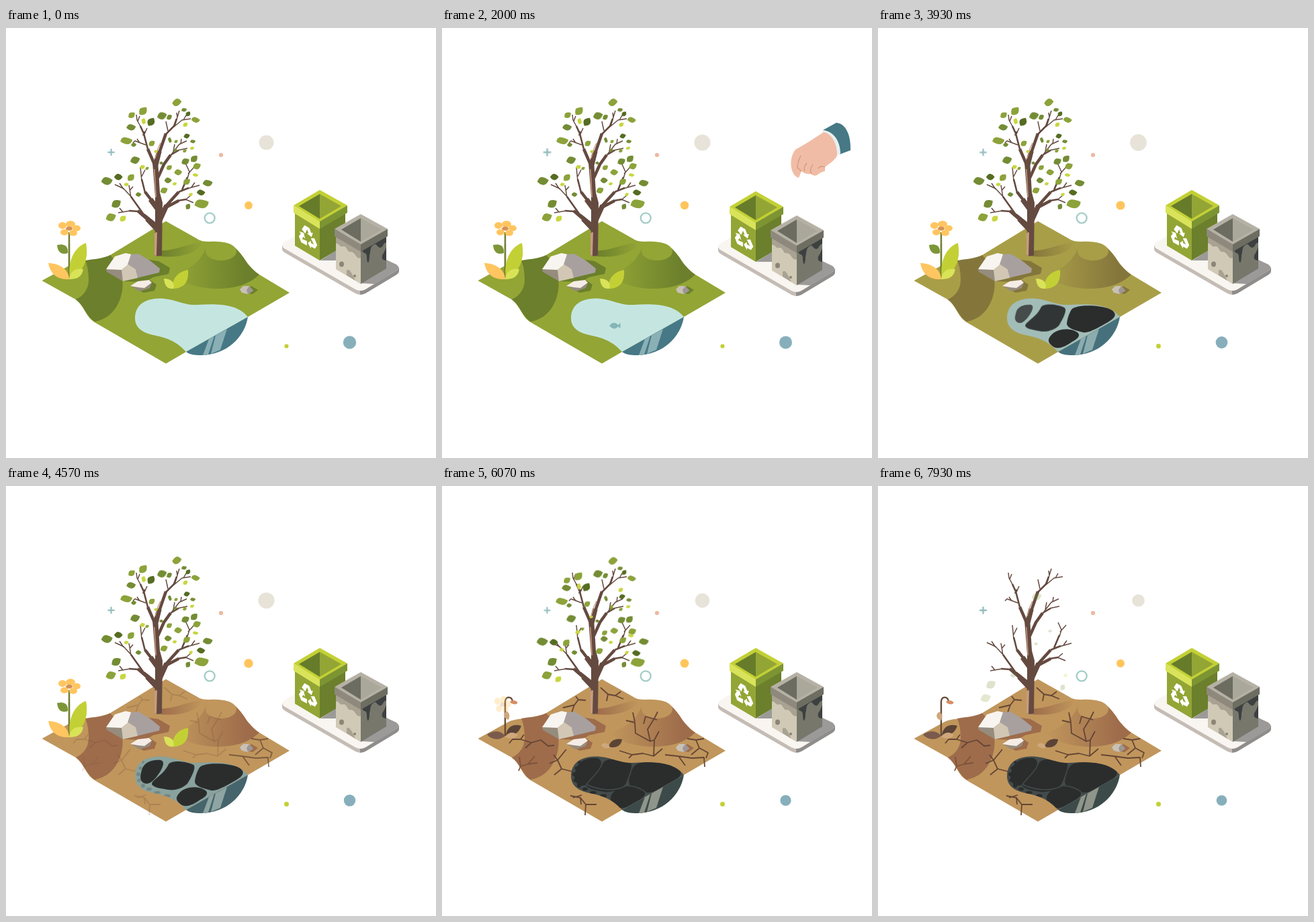
These frames come from a looping animation (640x640 px, 8000 ms). An HTML page without scripts:

```html
<!DOCTYPE html>
<html lang="en">
<head>
<meta charset="utf-8">
<title>Polluted meadow</title>
<style>
html,body{margin:0;width:100%;height:100%;overflow:hidden;background:#fff}
svg{display:block;width:100vw;height:100vh}
svg *{animation:0s linear infinite}
svg [class]{animation-duration:8s}

/* ground */
.land{fill:#93a535;stop-color:#93a535;animation-name:land}
.dark{fill:#6b7f2c;stop-color:#6b7f2c;animation-name:dark}
@keyframes land{0%,43.5%{fill:#93a535;stop-color:#93a535}55%,100%{fill:#c0965c;stop-color:#c0965c}}
@keyframes dark{0%,43.5%{fill:#6b7f2c;stop-color:#6b7f2c}55%,100%{fill:#9e6c4b;stop-color:#9e6c4b}}
.crack{fill:none;stroke:#654536;stroke-width:1.8;stroke-linejoin:bevel}
.c1{animation-name:c1}
.c2{animation-name:c2}
@keyframes c1{0%,52%{opacity:0}59%,100%{opacity:1}}
@keyframes c2{0%,55%{opacity:0}57%{opacity:.2}66%,100%{opacity:1}}

/* pond */
.water{fill:#c5e6e0;animation-name:water}
.side{fill:#467885;animation-name:side}
.glint{fill:#8ab0b5;animation-name:glint}
@keyframes water{0%,29%{fill:#c5e6e0}38%{fill:#c3e1db}57%{fill:#8aa39e}72%,100%{fill:#434b4a}}
@keyframes side{0%,45%{fill:#467885}57%{fill:#46646b}74%,100%{fill:#3c4b49}}
@keyframes glint{0%,45%{fill:#8ab0b5}57%{fill:#8fa5a3}74%,100%{fill:#8f958a}}
.oil{fill:#2b2d2d;stroke:#2b2d2d;transform-box:fill-box;transform-origin:50% 50%}
.o1{animation-name:o1}
.o2{animation-name:o2}
.o3{animation-name:o3}
.o4{animation-name:o4}
@keyframes o1{0%,27%{transform:scale(0);opacity:0;stroke-width:0}38.4%{transform:scale(.79);opacity:.9}46%,57%{transform:none;opacity:1;stroke-width:0}74%,100%{stroke-width:6}}
@keyframes o2{0%,32%{transform:scale(0);opacity:0;stroke-width:0}38.4%{transform:scale(.56);opacity:.6}47%,57%{transform:none;opacity:1;stroke-width:0}74%,100%{stroke-width:6}}
@keyframes o3{0%,35.5%{transform:translate(5px,6px) scale(0);opacity:0;stroke-width:0}38.4%{transform:translate(5px,6px) scale(.26);opacity:.25}50%,57%{transform:none;opacity:1;stroke-width:0}74%,100%{stroke-width:6}}
@keyframes o4{0%,39%{transform:scale(0);opacity:0;stroke-width:0}52%,57%{transform:none;opacity:1;stroke-width:0}74%,100%{stroke-width:6}}
.fish{fill:#86b5b8;animation-name:fish}
@keyframes fish{0%,6%{transform:translate(35px,6px);opacity:0}12%{opacity:1}25%{transform:none;opacity:1}31%{opacity:1}36%,100%{transform:translate(-16px,-6px);opacity:0}}

/* plants */
.fresh{animation-name:fresh}
.dry{animation-name:dry}
.head{animation-name:head;transform-box:fill-box;transform-origin:50% 50%}
.bud{animation-name:bud}
@keyframes fresh{0%,65%{opacity:1;transform:none}74%,100%{opacity:0;transform:translateY(8px)}}
@keyframes dry{0%,66%{opacity:0}74%,100%{opacity:1}}
@keyframes head{0%,66%{opacity:1;transform:none}76%{opacity:.3;transform:translate(-4px,27px) scale(.75,1.1)}82%,100%{opacity:0;transform:translate(-5px,36px) scale(.7,1.1)}}
@keyframes bud{0%,66%{opacity:0;transform:translate(5px,-6px)}76%{opacity:1;transform:translate(5px,-1px)}86%,100%{opacity:1;transform:none}}

/* tree leaves */
.a{fill:#8ca23a}.b{fill:#748c34}.c{fill:#556c22}.d{fill:#c8d640}
.early{animation-name:early}
.left{animation-name:left}
.right{animation-name:right}
.late{animation-name:late}
@keyframes early{0%,70%{transform:none;opacity:1}76%{transform:translate(-1px,11px);opacity:1}81%{transform:translate(2px,21px);opacity:.9}86.6%{transform:translate(4px,33px);opacity:.3}90%,100%{transform:translate(5px,38px);opacity:0}}
@keyframes left{0%,73%{transform:none;opacity:1}76%{transform:translate(-1px,4px)}86.6%{transform:translate(-3px,23px);opacity:1}95%,100%{transform:translate(-4px,40px);opacity:0}}
@keyframes right{0%,75.5%{transform:none;opacity:1}86.6%{transform:translate(5px,20px);opacity:1}96%,100%{transform:translate(7px,38px);opacity:0}}
@keyframes late{0%,77%{transform:none;opacity:1}86.6%{transform:translate(3px,11px);opacity:1}92%{opacity:.9}99.1%,100%{transform:translate(4px,34px);opacity:.25}}

/* hand and bins */
.hand{animation-name:hand}
.bins{animation-name:bins}
@keyframes hand{0%,1%{transform:translate(20px,-9px);opacity:0}10%,26%{transform:none;opacity:1}32%,100%{transform:translate(20px,-9px);opacity:0}}
@keyframes bins{0%,22.5%{transform:none}25%{transform:translateY(2px)}29%,100%{transform:none}}

/* floating dots */
.p1{animation-name:p1}
.p2{animation-name:p2}
.p3{animation-name:p3}
.p4{animation-name:p4}
.plus{animation-name:plus;transform-origin:156.5px 185px}
@keyframes p1{0%{r:11px}25%{r:12px}40%{r:12.7px}57%{r:12.1px}76%{r:10.7px}100%{r:9.3px}}
@keyframes p2{0%{r:9.7px}25%{r:9.5px}57%{r:8.7px}76%{r:8.1px}100%{r:7.8px}}
@keyframes p3{0%{r:5.9px}57%{r:6.7px}100%{r:6px}}
@keyframes p4{0%,25%{r:3.1px}57%,100%{r:3.5px}}
@keyframes plus{0%{transform:scale(.93)}25%{transform:scale(1.05)}57%{transform:scale(.93)}76%{transform:scale(.88)}100%{transform:none}}
</style>
</head>
<body>
<svg viewBox="0 0 640 640">
<defs>
  <path id="l" d="M-6 4Q-6.500-3-3-5Q1-6.500 6-5Q6.500 1 3.500 4Q0 6.500-6 4Z"/>
  <path id="arrow" d="M-9.5-7L-5-15H2.5L5.8-9.5L8.5-11L6.3-3.9L-1.2-5.3L1.5-7L-1-11L-4-3.6Z"/>
  <path id="pond" d="M192 432C192 412 207 403 228 402.500C252 402.500 262 413 285 412C312 410 345 410 360 430L268 482C250 462 232 460 215 456C200 452 192 444 192 432Z"/>
  <clipPath id="pool"><use href="#pond"/></clipPath>
  <linearGradient id="hill"><stop class="land"/><stop class="dark" offset=".85"/></linearGradient>
  <linearGradient id="shade"><stop class="dark"/><stop class="land" offset="1"/></linearGradient>
</defs>

<!-- ground -->
<path class="land" d="M53.500 376L99 351C114 344 140 347 155 338L238 287.500L285 314C294 320 305 317 315 318C337 318 348 333 357 347C362 354 369 362 377 367L422 394L360 430L268 482L238 499.500L131 437.500C117 428 116 410 100 402Z"/>
<path class="dark" d="M118 346C130 344 145 343 155 338C173 356 178 380 170 403C163 422 150 434 132 437C120 430 116 413 104 404C117 398 123 387 123 375C123 362 121 353 118 346Z"/>
<path fill="url(#shade)" d="M230 331C248 333 268 321 293 319C288 330 270 343 230 340Z"/>
<path fill="url(#hill)" d="M297 329C287 352 268 360 251 369C277 390 321 392 350 383C365 378 374 370 377 367C369 362 362 354 357 347C352 339 347 333 342 328Z"/>
<ellipse class="land" cx="320" cy="332.500" rx="23" ry="13.500"/>
<g class="dark">
  <path d="M200 343L227 347L244 357L242 366L219 371L207 378L174 377Z"/>
  <path d="M193 388L214 375L224 382L221 391L205 394Z"/>
  <path d="M355 394L365 384L375 390L367 396Z"/>
</g>

<g class="crack c1">
  <path d="M332 400L350 402L372 405L390 404L391 418M352 402L362 416M365 376L378 378L383 390L396 397L393 405M383 390L371 400M378 378L390 376"/>
</g>
<g class="crack c2">
  <path d="M274 349L287 352L288 368L310 380L316 378L315 402M310 380L306 362L316 346L321 336M287 351L284 337M300 354L303 343L320 348M316 378L323 365M264 394L283 400L299 398L315 402L328 391M283 400L278 405"/>
  <path d="M236 300L247 310L245 320M247 310L258 312L266 306M258 312L270 317M180 330L197 326L203 318L214 319M197 326L193 337M203 318L199 313"/>
  <path d="M100 383L105 377L117 377L133 382L147 378L158 387L167 386M117 377L122 370M133 382L124 390M185 392L172 408L178 421L194 425M172 408L160 413M178 421L167 430M172 408L166 400"/>
  <path d="M191 461L206 464L214 474L230 474M206 464L207 474M214 474L213 490M195 464L208 460"/>
  <path d="M115 403L117 417L128 414L138 402M128 414L142 412M117 417L114 424" stroke="#7d533b"/>
</g>

<!-- pond -->
<use href="#pond" class="water"/>
<g clip-path="url(#pool)">
  <g class="c2" fill="#2b2d2d"><circle cx="200" cy="420" r="2.500"/><circle cx="197" cy="429" r="3"/><circle cx="198" cy="438" r="2.500"/><circle cx="204" cy="446" r="3"/><ellipse cx="213" cy="451" rx="4" ry="2.500"/><ellipse cx="225" cy="456" rx="5" ry="2"/><ellipse cx="240" cy="461" rx="5" ry="2.500"/><circle cx="204" cy="411" r="2"/></g>
  <path class="oil o4" d="M202 423C205 410 220 407 230 408C239 410 231 424 224 433C217 441 212 445 205 442C198 438 200 431 202 423Z"/>
  <path class="oil o3" d="M242 414C247 407 270 410 279 415C284 419 275 435 270 443C264 449 252 454 241 452C230 450 220 449 217 444C217 437 235 430 242 414Z"/>
  <path class="oil o1" d="M288 419C296 411 330 412 347 419C357 426 353 431 342 438C331 444 314 455 305 453C292 450 281 446 281 440C282 431 285 424 288 419Z"/>
  <path class="oil o2" d="M258 457C265 448 284 446 293 451C303 455 300 461 289 467C280 473 270 479 262 475C252 469 252 463 258 457Z"/>
  <path class="dry" fill="none" stroke="#434b4a" stroke-width="1.500" d="M239 406C240 421 224 432 215 444C230 452 257 456 274 446C277 433 284 424 283 412M274 446C287 446 297 450 304 457"/>
</g>
<path class="fish" d="M249 443Q256 435 262 442L265.500 439V447L262 444.500Q256 451 249 443Z"/>
<path class="side" d="M360 430C355.500 460 328 487 290 487C280 487 273 486 268 482Z"/>
<path class="glint" d="M302 463L310 458.500L301 486L293 487ZM312 457.500L329 448L319 479L305 485Z"/>

<!-- rocks -->
<path fill="#958c7e" d="M149 360L163 352L174 362V377L150 363Z"/>
<path fill="#f8f4f0" d="M149 359L162 340L178 335L187 337L182 352L172 360Z"/>
<path fill="#a8a09f" d="M186 337L197 336L214 346L229 358L228 364L195 372L193 359L181 352Z"/>
<path fill="#d2c7b4" d="M172 360L182 352L193 359L196 372L174 377Z"/>
<path fill="#958c7e" d="M185 384L196 386L206 384L217 379L214 387L199 392Z"/>
<path fill="#f6ece6" d="M185 384L196 377L213 375L217 379L206 387L197 386Z"/>
<path fill="#c9c0b6" d="M348 389L353 384L362 384L368 391L360 396L351 394Z"/>
<path fill="#9d9693" d="M362 384L368 391L360 396L358 390Z"/>

<!-- sprout -->
<g class="fresh"><path fill="#c3d035" d="M249 388C245 374 257 362 271 360C272 375 268 387 249 388Z"/><path fill="#d9e358" d="M235 373C247 373 252 380 249 388C238 389 236 381 235 373Z"/></g>
<g class="dry"><path fill="#5b4336" d="M248 388C251 378 259 375 268 377C267 387 258 391 248 388Z"/><path fill="#cfa77c" d="M237 386C241 380 247 382 250 389C246 392 240 390 237 386Z"/></g>

<!-- flower -->
<path d="M94 322V372" stroke="#64572f" stroke-width="2.200"/>
<path class="dry" d="M94 372V322C94 313 103 312 105 320" fill="none" stroke="#654a35" stroke-width="2.200"/>
<g class="fresh">
  <path d="M94 304V372" stroke="#6f7f31" stroke-width="2.500"/>
  <path fill="#7d9638" d="M76 323C88 320 93 326 92 335C83 338 77 334 76 323Z"/>
  <path fill="#c3d035" d="M95 373C91 344 104 325 119 320C123 341 118 363 95 373Z"/>
  <path fill="#ffc560" d="M63 350C80 350 94 360 94 374C77 375 66 367 63 350Z"/>
  <path fill="#d9e358" d="M94 374C95 361 105 357 115 359C113 371 105 374 94 374Z"/>
</g>
<g class="head" fill="#ffc560"><ellipse cx="84" cy="294" rx="6" ry="5"/><ellipse cx="96" cy="292" rx="7" ry="5"/><ellipse cx="105" cy="298" rx="6" ry="4.500"/><ellipse cx="100" cy="305" rx="6" ry="4.500"/><ellipse cx="87" cy="304" rx="6" ry="4.500"/><ellipse cx="94" cy="298.500" rx="5" ry="3" fill="#d39159"/></g>
<g class="dry">
  <path fill="#7a5a4c" d="M67 370C77 363 88 364 94 372C86 379 74 378 67 370Z"/>
  <path fill="#5b4336" d="M95 372C96 358 107 353 118 357C115 367 107 372 95 372Z"/>
  <path fill="#cfa77c" d="M94 373C100 365 108 366 113 371C107 377 100 377 94 373Z"/>
  <ellipse cx="107" cy="322" rx="5.500" ry="2.700" fill="#d98c62" transform="rotate(8 107 322)"/>
</g>
<path class="bud" fill="#cfa77c" d="M91 336Q98 340 94 349Q85 346 88 339Z"/>

<!-- tree -->
<path fill="#654a40" d="M221 338L222 292L222 250L218 200L226 196L229 245L233 260L232 338Q227 341 221 338Z"/>
<path fill="#c79c80" d="M221 338V306L225 302L224 339ZM220 210L222.500 252H224L221.500 210Z"/>
<g fill="none" stroke="#654a40" stroke-linejoin="round">
  <path stroke-width="7.500" d="M227 302L210 284M223 203L228 183M229 286L239 264M226 270L215 255"/>
  <path stroke-width="4.500" d="M221 203L211 180M228 186L238 157M226 223L235 203L245 189M238 265L257 244M212 286L196 272M217 257L207 244M240 266L257 257M225 294L205 278"/>
  <path stroke-width="2.600" d="M211 180L205 157L200 146M238 158L250 146L254 135M245 189L257 182M257 244L272 238M262 241L270 222M197 273L183 272M206 279L186 251M207 245L202 225M204 160L207 154M256 257L268 255"/>
  <path stroke-width="1.500" d="M201 148L195 137L194 129M196 139L199 131M205 160L210 149M208 174L192 168L189 171M199 171L195 165M251 146L258 123M255 133L254 126M250 147L262 137L275 135M264 137L268 130M241 153L238 139M256 182L270 179M247 187L258 173L269 168M249 184L251 173M260 173L261 165M270 239L288 234M276 237L281 230M270 224L273 214L268 203M271 217L280 207M267 255L279 260M268 255L275 249M185 272L167 275M174 274L169 268M188 253L175 239L162 233M175 240L169 231M186 252L183 234M184 242L189 236M202 228L200 207M202 221L207 211"/>
</g>
<path d="M222 194L226 180L230 171" fill="none" stroke="#c79c80" stroke-width="1.300"/>

<g class="late">
  <use href="#l" class="b" transform="translate(232 131)rotate(20)"/>
  <use href="#l" class="b" transform="translate(164 262)rotate(5)scale(1.050)"/>
  <use href="#l" class="a" transform="translate(156 282)rotate(15)scale(1.080)"/>
  <use href="#l" class="b" transform="translate(271 266)rotate(-15)scale(.6,.7)"/>
  <use href="#l" class="b" transform="translate(197 248)rotate(30)scale(.6)"/>
  <use href="#l" class="d" transform="translate(275 248)scale(.45)"/>
  <use href="#l" class="b" transform="translate(252 182)rotate(30)scale(.4)"/>
  <use href="#l" class="b" transform="translate(231 201)rotate(40)scale(.4)"/>
</g>
<g class="early">
  <use href="#l" class="a" transform="translate(187 130)scale(.78)"/>
  <use href="#l" class="a" transform="translate(204 124)rotate(-10)"/>
  <use href="#l" class="c" transform="translate(216 140)rotate(-18)scale(.95)"/>
  <use href="#l" class="c" transform="translate(167 222)rotate(35)scale(.85)"/>
  <use href="#l" class="a" transform="translate(186 223)rotate(-10)scale(.85)"/>
  <use href="#l" class="a" transform="translate(284 206)rotate(12)scale(.85)"/>
  <use href="#l" class="d" transform="translate(267 144)scale(.55)"/>
  <use href="#l" class="d" transform="translate(205 139)rotate(-25)scale(.5,.75)"/>
  <use href="#l" class="d" transform="translate(203 207)rotate(15)scale(.55)"/>
  <use href="#l" class="d" transform="translate(179 233)rotate(20)scale(.5)"/>
  <use href="#l" class="a" transform="translate(243 208)scale(.65)"/>
  <use href="#l" class="a" transform="translate(253 169)scale(.42)"/>
  <use href="#l" class="d" transform="translate(223 184)rotate(35)scale(.4)"/>
</g>
<g class="left">
  <use href="#l" class="b" transform="translate(186 148)rotate(25)scale(1,.85)"/>
  <use href="#l" class="a" transform="translate(179 168)rotate(18)scale(1.350,.9)"/>
  <use href="#l" class="b" transform="translate(150 228)rotate(25)scale(1.200,1.050)"/>
  <use href="#l" class="d" transform="translate(174 284)rotate(-8)scale(.75)"/>
  <use href="#l" class="c" transform="translate(290 245)rotate(30)scale(.9,.75)"/>
  <use href="#l" class="a" transform="translate(235 242)rotate(10)scale(.8)"/>
  <use href="#l" class="b" transform="translate(280 195)rotate(-8)scale(.85)"/>
  <use href="#l" class="c" transform="translate(269 161)rotate(20)scale(.65)"/>
  <use href="#l" class="b" transform="translate(190 174)rotate(30)scale(.55)"/>
  <use href="#l" class="a" transform="translate(217 172)scale(.72)"/>
  <use href="#l" class="d" transform="translate(282 219)rotate(20)scale(.65,.45)"/>
  <use href="#l" class="a" transform="translate(210 209)rotate(10)scale(.42)"/>
</g>
<g class="right">
  <use href="#l" class="a" transform="translate(254 111)rotate(35)scale(.85,1.100)"/>
  <use href="#l" class="b" transform="translate(265 122)rotate(10)scale(.6,.5)"/>
  <use href="#l" class="c" transform="translate(271 128)rotate(-10)scale(.58)"/>
  <use href="#l" class="b" transform="translate(243 133)rotate(10)scale(.58,.7)"/>
  <use href="#l" class="a" transform="translate(282 137)rotate(30)scale(.95,.7)"/>
  <use href="#l" class="b" transform="translate(300 231)rotate(20)scale(1.080,.85)"/>
  <use href="#l" class="a" transform="translate(291 262)rotate(15)scale(1.600,1.150)"/>
  <use href="#l" class="b" transform="translate(192 197)rotate(20)"/>
  <use href="#l" class="b" transform="translate(241 227)rotate(35)scale(.75)"/>
  <use href="#l" class="b" transform="translate(267 199)rotate(10)scale(.85)"/>
  <use href="#l" class="a" transform="translate(256 215)rotate(30)scale(.8)"/>
  <use href="#l" class="a" transform="translate(269 229)scale(.8)"/>
  <use href="#l" class="b" transform="translate(244 167)rotate(-30)scale(.4,.7)"/>
  <use href="#l" class="b" transform="translate(278 169)rotate(20)scale(.6,.45)"/>
  <use href="#l" class="d" transform="translate(277 179)scale(.5,.4)"/>
  <use href="#l" class="a" transform="translate(266 183)scale(.45)"/>
  <use href="#l" class="d" transform="translate(251 232)rotate(25)scale(.45)"/>
</g>

<!-- bins -->
<g class="bins">
  <path fill="#c4bcb5" d="M411 323V329Q411 332 416 335L520 395Q524 397 528 397V385Z"/>
  <path fill="#8f8d8b" d="M585 356V362Q585 365 580 368L535 395Q531 397 527 397V385Z"/>
  <path fill="#f9f5f1" d="M414 319L467 288L581 352Q588 357 581 361L535 389Q528 393 520 389L414 328Q408 323 414 319Z"/>
  <path fill="#9c9a98" d="M529 380L566 345L581 352Q588 357 581 361L549 381ZM468 346L505 322V340L490 346Z"/>

  <path fill="#93a535" d="M430 274L467 297V346L430 324Z"/>
  <path fill="#6b7f2c" d="M467 297L505 275V323L467 346Z"/>
  <path fill="#c3d035" d="M467 241L508 264L467 289L428 264Z"/>
  <path fill="#667c2a" d="M467 247L436 265L467 284Z"/>
  <path fill="#93a535" d="M467 247L499 265L467 284Z"/>
  <path fill="#d9e35a" d="M428 264L467 288V299L428 275Z"/>
  <path fill="#7d9433" d="M467 288L508 264V275L467 299Z"/>
  <g fill="#fff" transform="matrix(.92 .53 0 1.060 449 312)"><use href="#arrow"/><use href="#arrow" transform="rotate(120)"/><use href="#arrow" transform="rotate(240)"/></g>

  <path fill="#d0c9b6" d="M491 309L528 332V381L491 359Z"/>
  <path fill="#77776c" d="M528 332L566 310V358L528 381Z"/>
  <path fill="#a9a292" d="M491 309L528 332V342C522 346 520 333 513 333C508 335 508 324 502 325C496 327 496 319 491 321ZM507 361C511 356 515 366 520 376L507 368Z"/>
  <ellipse cx="499.500" cy="351.500" rx="3.500" ry="4" fill="#8c8475"/><circle cx="519" cy="369" r="2" fill="#8c8475"/>
  <path fill="#3d4040" d="M530 331L566 310V319C560 321 562 326 557 327C551 326 552 319 547 323C541 326 543 334 541 338C541 352 537 353 537 340C536 332 533 338 530 331ZM566 326V346Q558 346 560 338Q563 334 566 326Z"/>
  <path fill="#b6b1a5" d="M528 277L568 299L528 323L489 299Z"/>
  <path fill="#6c6c60" d="M528 283L499 300L528 318Z"/>
  <path fill="#aaa79b" d="M528 283L559 300L528 318Z"/>
  <path fill="#8e897c" d="M489 299L528 322V333L489 310Z"/>
  <path fill="#6d6d62" d="M528 322L568 299V310L528 333Z"/>
</g>

<!-- hand -->
<g class="hand">
  <path fill="#467885" d="M567 152L587 141C601 142 609 160 608 182L592 188C592 170 584 154 567 152Z"/>
  <path fill="#e9eff1" d="M566 153C582 152 593 168 593 187L587 190C587 174 578 161 567 157Z"/>
  <path fill="#f1bca5" d="M568 155C580 157 589 173 588 190C584 198 576 202 570 207V213C565 214 562 216 558 219C553 221 550 218 549 217C543 218 538 216 535 213L531 223C525 222 521 214 520 208C518 198 521 187 526 181C541 173 554 164 568 155Z"/>
  <path fill="none" stroke="#cf967d" stroke-width="1.200" d="M534 190Q529 200 529 208L535 213M543 201Q537 208 540 213M552 203Q546 212 550 217M570 207Q564 204 560 209"/>
</g>

<!-- floating marks -->
<circle class="p1" cx="387.500" cy="170.500" r="11" fill="#e8e3d8"/>
<circle class="p2" cx="511.500" cy="468" r="9.500" fill="#87afbb"/>
<circle class="p3" cx="361" cy="264" r="6" fill="#ffc55c"/>
<circle class="p4" cx="417.500" cy="473.500" r="3.200" fill="#c3d035"/>
<circle cx="320" cy="189" r="3.100" fill="#edb9a0"/>
<circle cx="303.200" cy="282.800" r="7.500" fill="none" stroke="#a3cdc7" stroke-width="2.300"/>
<path class="plus" d="M151 185H162M156.500 179.500V190.500" stroke="#93bdbf" stroke-width="2.400"/>
</svg>
</body>
</html>
```
